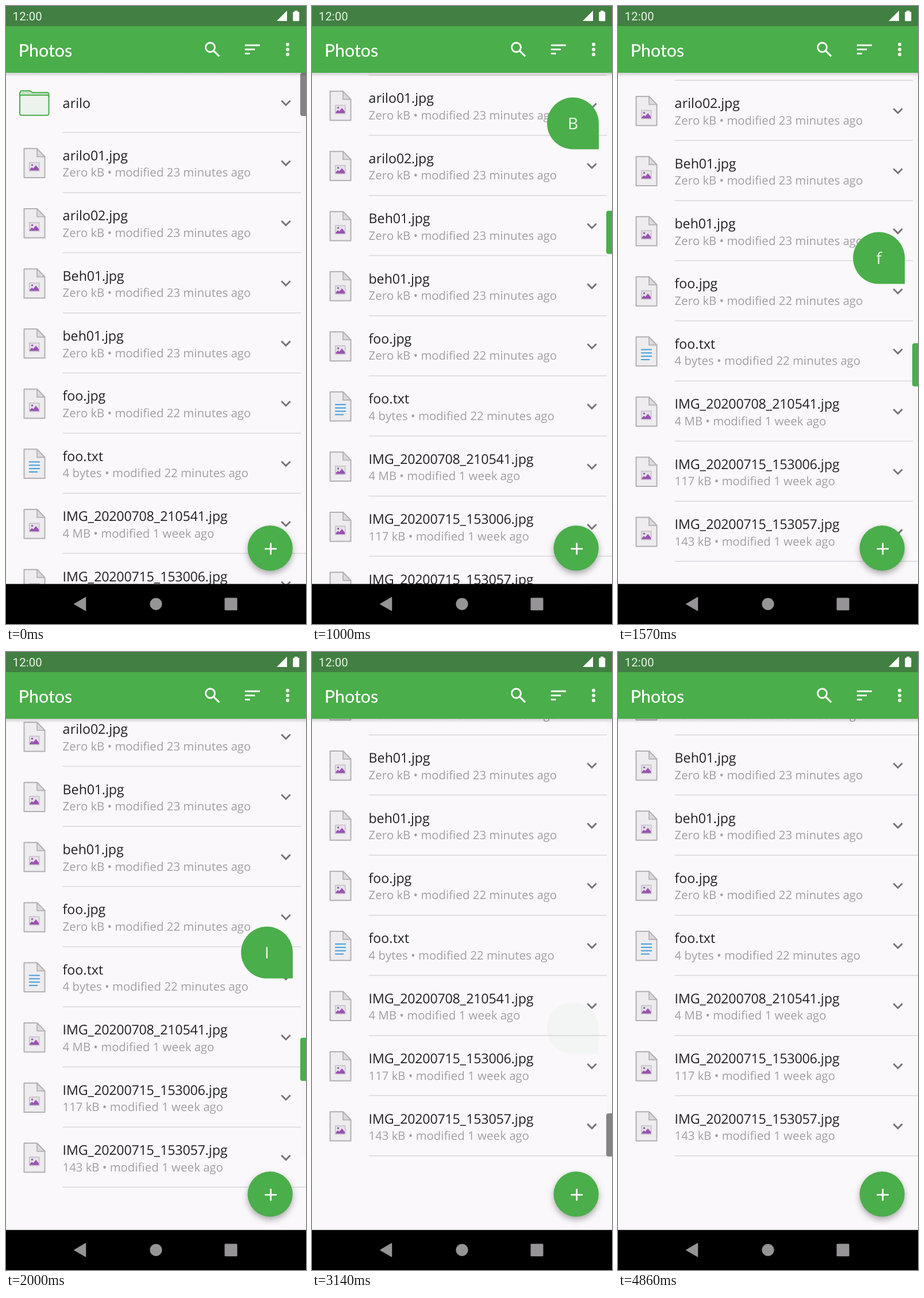
Recreate the animation shown at these times as an HTML page with a canvas. Size 522 by 1073 pixels, loop 5010 ms.

```html
<!DOCTYPE html>
<html lang="en">
<head>
<meta charset="utf-8">
<title>Photos</title>
<style>
  html, body { margin: 0; width: 100%; height: 100%; overflow: hidden; background: #faf8fb; }
  canvas { display: block; width: 522px; height: 1073px; }
</style>
</head>
<body>
<canvas id="stage"></canvas>
<script>
const W = 522, H = 1073;
const DP = 1.45, DENSITY = 3;
const LOOP = 5010, FRAME = 1000 / 7, LAST = 34;
const TOP = 116, NAV = 1003.5, ROW = 104.4, MAX = 284.5;
const THUMB_RATIO = 2.408, THUMB_H = 75;
const GREEN = '#4aae4a', BACK = '#faf8fb', GREY = '#b2b0b3';
const SANS = '"Open Sans", sans-serif', ROBOTO = 'Roboto, sans-serif';

const rows = [
  ['arilo'],
  ['arilo01.jpg', 'Zero kB • modified 23 minutes ago'],
  ['arilo02.jpg', 'Zero kB • modified 23 minutes ago'],
  ['Beh01.jpg', 'Zero kB • modified 23 minutes ago'],
  ['beh01.jpg', 'Zero kB • modified 23 minutes ago'],
  ['foo.jpg', 'Zero kB • modified 22 minutes ago'],
  ['foo.txt', '4 bytes • modified 22 minutes ago'],
  ['IMG_20200708_210541.jpg', '4 MB • modified 1 week ago'],
  ['IMG_20200715_153006.jpg', '117 kB • modified 1 week ago'],
  ['IMG_20200715_153057.jpg', '143 kB • modified 1 week ago']
];

// Drag of the scroll thumb: time in ms, list offset in px
const drag = [
  [200, 0], [1000, 99.5], [1540, 195], [1600, 195], [1900, 230], [2060, 230],
  [2400, 0], [2500, 0], [18 * FRAME, 200.4], [2602, MAX]
];
const PRESS = 100, RELEASE = 2998, HIDE = 3930;

const canvas = document.getElementById('stage');
const ctx = canvas.getContext('2d');
const dpr = window.devicePixelRatio || 1;
canvas.width = W * dpr;
canvas.height = H * dpr;
ctx.textRendering = 'geometricPrecision';

const clamp = (v, a = 0, b = 1) => Math.min(b, Math.max(a, v));

function offsetAt(t) {
  if (t <= drag[0][0]) return drag[0][1];
  for (let i = 1; i < drag.length; i++) {
    const [t0, s0] = drag[i - 1], [t1, s1] = drag[i];
    if (t <= t1) return s0 + (s1 - s0) * (t - t0) / (t1 - t0);
  }
  return MAX;
}

function rect(x, y, w, h, color) {
  ctx.fillStyle = color;
  ctx.fillRect(x, y, w, h);
}

function disc(x, y, r, color) {
  ctx.fillStyle = color;
  ctx.beginPath();
  ctx.arc(x, y, r, 0, Math.PI * 2);
  ctx.fill();
}

function poly(points, fill, stroke, width = 2, closed = true) {
  ctx.beginPath();
  points.forEach(([x, y]) => ctx.lineTo(x, y));
  if (closed) ctx.closePath();
  if (fill) { ctx.fillStyle = fill; ctx.fill(); }
  if (stroke) { ctx.strokeStyle = stroke; ctx.lineWidth = width; ctx.stroke(); }
}

// Phone text: glyph advances snap to whole device pixels
function label(str, x, y, sp, family, color) {
  ctx.save();
  ctx.translate(x, y);
  ctx.scale(DP / DENSITY, DP / DENSITY);
  ctx.font = `${sp * DENSITY}px ${family}`;
  ctx.fillStyle = color;
  let pen = 0;
  for (const ch of str) {
    ctx.fillText(ch, pen, 0);
    pen += Math.round(ctx.measureText(ch).width);
  }
  ctx.restore();
}

function text(str, x, y, font, color, align = 'left') {
  ctx.font = font;
  ctx.fillStyle = color;
  ctx.textAlign = align;
  ctx.fillText(str, x, y);
  ctx.textAlign = 'left';
}

function folder(y) {
  ctx.lineJoin = 'round';
  poly([[24, y - 18], [26, y - 21], [41, y - 21], [46, y - 18], [73, y - 18], [74.5, y - 16],
        [74.5, y - 10], [24, y - 10]], '#c9e0ca', GREEN);
  ctx.beginPath();
  ctx.roundRect(24, y - 13.5, 50.5, 35, 3);
  ctx.fillStyle = '#ebf3ec';
  ctx.fill();
  ctx.strokeStyle = GREEN;
  ctx.stroke();
}

function picture(y) {
  rect(40, y - 1.5, 18.5, 16, '#c3c1c5');
  rect(41.5, y, 15.5, 13, '#e4e2e6');
  disc(45.5, y + 3.5, 1.7, '#9b51b5');
  poly([[41.5, y + 13], [41.5, y + 11], [45, y + 7.5], [47.5, y + 9.5], [52, y + 4],
        [57, y + 10], [57, y + 13]], '#9b51b5');
}

function file(y, isText) {
  ctx.lineJoin = 'round';
  poly([[31.5, y - 25], [54, y - 25], [67.5, y - 11], [67.5, y + 25.5], [31.5, y + 25.5]], '#eeecef', GREY);
  poly([[54, y - 25], [54, y - 11], [67.5, y - 11]], '#dbd9dc', GREY, 1.7);
  if (!isText) return picture(y);
  for (let i = 0; i < 4; i++) rect(40, y - 4 + i * 5.8, i < 3 ? 19 : 15, 1.9, '#3d9bdb');
}

function chevron(y) {
  ctx.lineJoin = 'miter';
  poly([[479.3, y - 3.9], [487, y + 3.8], [494.7, y - 3.9]], null, '#767477', 2.9, false);
}

function list(offset) {
  const left = 68 * DP;
  rows.forEach(([name, info], i) => {
    const y = TOP + i * ROW - offset, mid = y + ROW / 2;
    if (y > NAV || y + ROW < TOP) return;
    label(name, left, info ? y + 47.4 : mid + 8.8, 16, SANS, '#201f21');
    if (info) {
      file(mid, name.endsWith('.txt'));
      label(info, left, y + 75.9, 14, SANS, '#a19fa2');
    } else {
      folder(mid);
    }
    chevron(mid);
    rect(left, y + ROW - 1.5, W, 1.5, '#dad8db');
  });
}

function scrollbar(t, offset, pressed) {
  const out = clamp((t - HIDE) / 200);
  if (out === 1) return;
  const x = 513 + 10 * out * out;
  rect(x, TOP, 10, 760, '#f8f6f9');
  ctx.fillStyle = pressed ? GREEN : '#858386';
  ctx.beginPath();
  ctx.roundRect(x - 1, TOP + offset * THUMB_RATIO, 14, THUMB_H, 4);
  ctx.fill();
}

function bubble(t, offset) {
  const alpha = clamp((t - PRESS) / 100) * (1 - clamp((t - RELEASE) / 150));
  if (!alpha) return;
  const x = 409, r = 45;
  // The bubble trails the thumb by one screen refresh
  const y = Math.max(TOP, TOP + offsetAt(t - 13) * THUMB_RATIO - 193);
  const index = Math.min(rows.length - 1, Math.floor(offset / MAX * rows.length));
  ctx.globalAlpha = alpha;
  ctx.fillStyle = GREEN;
  ctx.beginPath();
  ctx.roundRect(x, y, 2 * r, 2 * r, [r, r, 0, r]);
  ctx.fill();
  text(rows[index][0][0], x + r, y + r + 10.5, `28px ${SANS}`, '#eef7ee', 'center');
  ctx.globalAlpha = 1;
}

function fab() {
  ctx.save();
  ctx.shadowColor = 'rgba(0,0,0,0.32)';
  ctx.shadowBlur = 11 * dpr;
  ctx.shadowOffsetY = 5 * dpr;
  disc(459.6, 941.2, 39.2, GREEN);
  ctx.restore();
  rect(450.4, 941, 20.6, 2.8, '#fff');
  rect(459.3, 932.1, 2.8, 20.6, '#fff');
}

function statusBar() {
  rect(0, 0, W, 35, '#427f42');
  label('12:00', 11.6, 25, 14, ROBOTO, '#eaf2ea');
  poly([[471, 26], [489, 8], [489, 26]], '#fff');
  rect(502.3, 8, 5, 3, '#fff');
  ctx.beginPath();
  ctx.roundRect(499.3, 10, 11, 16.3, 1.5);
  ctx.fill();
}

function appBar() {
  const shade = ctx.createLinearGradient(0, TOP, 0, TOP + 7);
  shade.addColorStop(0, 'rgba(0,0,0,0.16)');
  shade.addColorStop(1, 'rgba(0,0,0,0)');
  rect(0, TOP, W, 7, shade);
  rect(0, 35, W, TOP - 35, GREEN);
  text('Photos', 21.8, 88, '500 30.3px Lato, sans-serif', '#fff');

  ctx.strokeStyle = '#fff';
  ctx.lineWidth = 2.9;
  ctx.beginPath();
  ctx.arc(355.4, 71.8, 8, 0, Math.PI * 2);
  ctx.stroke();
  poly([[361, 77.4], [371, 87.4]], null, '#fff', 3.2, false);

  [26.1, 17.4, 8.7].forEach((w, i) => rect(415.7, 66.7 + i * 7.25, w, 2.9, '#fff'));
  for (let i = -1; i < 2; i++) disc(490, 75.4 + i * 8.7, 3, '#fff');
}

function navBar() {
  const grey = '#969497';
  rect(0, NAV, W, H - NAV, '#000');
  ctx.lineJoin = 'round';
  poly([[119, 1038.3], [138.5, 1027], [138.5, 1049.6]], grey, grey, 1.5);
  disc(261, 1038.3, 10.6, grey);
  ctx.beginPath();
  ctx.roundRect(380.4, 1027.4, 22, 21.8, 1.5);
  ctx.fill();
}

function draw(t) {
  const offset = offsetAt(t);
  ctx.setTransform(dpr, 0, 0, dpr, 0, 0);
  rect(0, 0, W, H, BACK);
  list(offset);
  scrollbar(t, offset, t >= PRESS && t < RELEASE);
  fab();
  bubble(t, offset);
  appBar();
  statusBar();
  navBar();
}

function tick(now) {
  const step = Math.min(LAST, Math.floor((now % LOOP + 3) / FRAME));
  draw(step * FRAME);
  requestAnimationFrame(() => tick(performance.now() - start));
}

const start = performance.now();
tick(0);
</script>
</body>
</html>
```
